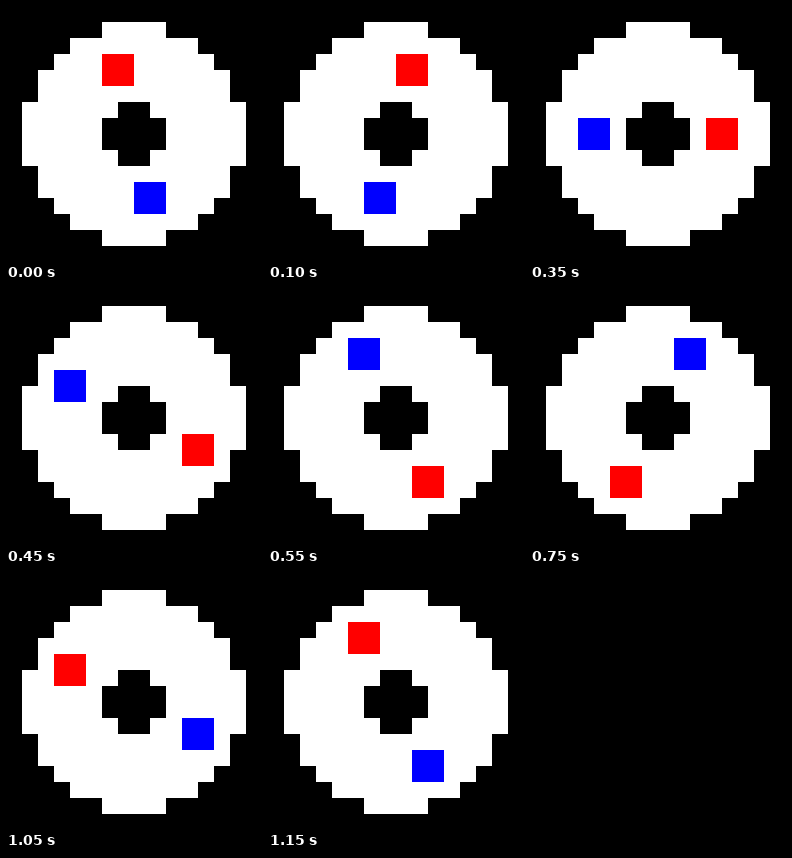
Recreate the animation shown at these times as an HTML page with a canvas. Size 256 px wide and 256 px high, loop 1200 ms.

```html
<!DOCTYPE html>
<html lang="en">
<head>
<meta charset="utf-8">
<title>Spinning disc</title>
<style>
  html, body { margin: 0; height: 100%; overflow: hidden; background: #000; }
  canvas { display: block; width: 100vw; height: 100vh; image-rendering: pixelated; }
</style>
</head>
<body>
<canvas width="256" height="256"></canvas>
<script>
const ctx = document.querySelector('canvas').getContext('2d');
const CELL = 16, STEP = 50, STEPS = 24;
const discHalf = [0, 2, 4, 5, 6, 6, 7, 7]; // half-width of each row, top to middle

function block(color, x, y, w, h) {
  ctx.fillStyle = color;
  ctx.fillRect(x * CELL, y * CELL, w * CELL, h * CELL);
}

// Clamped triangle wave: one coordinate of an octagonal path
function wave(k) {
  const t = (k + STEPS) % STEPS;
  const v = t < 13 ? 6 - Math.abs(t - 7) : Math.abs(t - 19) - 6;
  return Math.max(-4, Math.min(4, v));
}

function draw(k) {
  block('#000', 0, 0, 16, 16);
  discHalf.forEach((half, row) => {
    block('#fff', 8 - half, row, 2 * half, 1);
    block('#fff', 8 - half, 15 - row, 2 * half, 1);
  });
  block('#000', 7, 6, 2, 4);
  block('#000', 6, 7, 4, 2);

  const x = wave(k), y = wave(k - 6);
  block('#f00', 7 + x, 7 + y, 2, 2);
  block('#00f', 7 - x, 7 - y, 2, 2);
}

function tick() {
  draw(Math.floor(performance.now() / STEP) % STEPS);
  requestAnimationFrame(tick);
}
tick();
</script>
</body>
</html>
```
